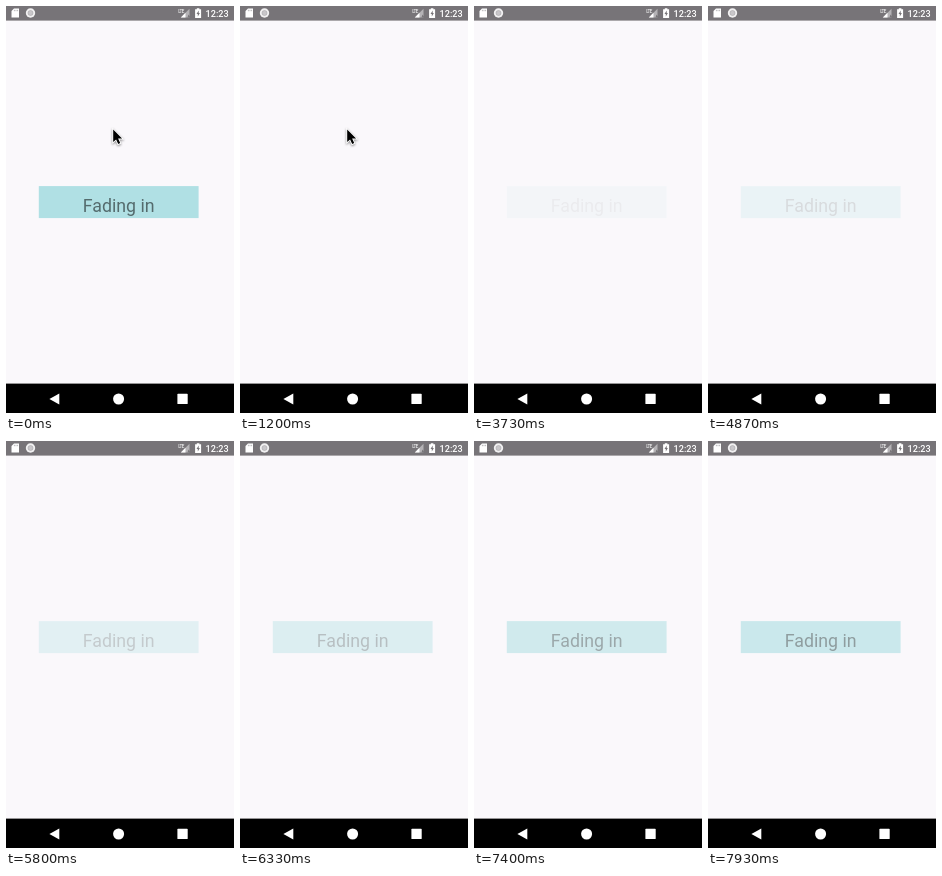
Write an HTML page that moves like this. It is 228 px wide and 407 px high and loops after 8 s.

```html
<!DOCTYPE html>
<html lang="en">
<head>
<meta charset="utf-8">
<title>Fading in</title>
<style>
  html, body { margin: 0; width: 100%; height: 100%; overflow: hidden; background: #faf8fb; }
  svg { display: block; width: 228px; height: 407px; font-family: Roboto, sans-serif; }
  #cursor { filter: drop-shadow(.5px 1px .8px rgba(0, 0, 0, .45)); }
</style>
</head>
<body>
<svg viewBox="0 0 228 407">
  <rect width="228" height="407" fill="#faf8fb"/>

  <!-- status bar -->
  <rect width="228" height="14.6" fill="#777478"/>
  <g fill="#fff">
    <path d="M8 2.5h5v9H5.5V5z"/>
    <path d="M8.4 3.8v1.4M10 3.8v1.4M11.6 3.8v1.4" stroke="#777478" stroke-width=".5"/>
    <circle cx="24.5" cy="7" r="4.7" fill="#f1f0f1"/>
    <circle cx="24.5" cy="7" r="2.5" fill="#c9c7ca" stroke="#aaa8ab" stroke-width=".6"/>
    <text x="172.3" y="6.8" font-size="4.6" font-weight="500" textLength="6" fill="#eee">LTE</text>
    <path d="M183.5 2.8v8.7h-8.7z" fill="#b5b3b6"/>
    <path d="M179.5 6.8v4.7h-4.7z"/>
    <path d="M182.5 8.5l2 3h-3z" fill="#777478"/>
    <path d="M190.8 2.3h2.6v1h1.7v8.6h-6V3.3h1.7z"/>
    <path d="M192.7 4.6l-2.2 3.4h1.3v2.6l2.1-3.5h-1.2z" fill="#777478"/>
    <text x="199.6" y="10.6" font-size="9.1" font-weight="500">12:23</text>
  </g>

  <!-- navigation bar -->
  <rect y="377.6" width="228" height="30"/>
  <g fill="#fff">
    <path d="M43.4 393l9.9-5.5v11z"/>
    <circle cx="112.6" cy="393" r="5.5"/>
    <rect x="171.4" y="387.8" width="10.3" height="10.3" rx=".7"/>
  </g>

  <g id="box">
    <rect x="32.8" y="180.1" width="159.8" height="32" fill="#b0e0e4"/>
    <text x="112.7" y="205.9" font-size="17.8" text-anchor="middle" fill-opacity=".52">Fading in</text>
  </g>

  <path id="cursor" d="M0 0v12.4l2.9-2.6 2.1 4.6 2-.9-2.1-4.5h4z"
        stroke="#fff" stroke-width="1.8" paint-order="stroke"/>
</svg>
<script>
  const LOOP = 8000, CLEAR = 1200, MOVE = 1930, START = 2000, FADE = 10000;
  const box = document.getElementById('box');
  const cursor = document.getElementById('cursor');

  const easeIn = x => x ** 1.65;
  const easeInOut = x => x < .5 ? easeIn(2 * x) / 2 : 1 - easeIn(2 - 2 * x) / 2;

  function opacityAt(t) {
    if (t < CLEAR) return 1;
    return t < START ? 0 : easeInOut((t - START) / FADE);
  }

  function draw(now) {
    const t = now % LOOP;
    box.setAttribute('opacity', opacityAt(t));
    cursor.setAttribute('visibility', t < START ? 'visible' : 'hidden');
    cursor.setAttribute('transform', t < MOVE ? 'translate(107.2 123.6)' : 'translate(70 128.5)');
  }

  function tick() {
    draw(performance.now());
    requestAnimationFrame(tick);
  }
  tick();
</script>
</body>
</html>
```
